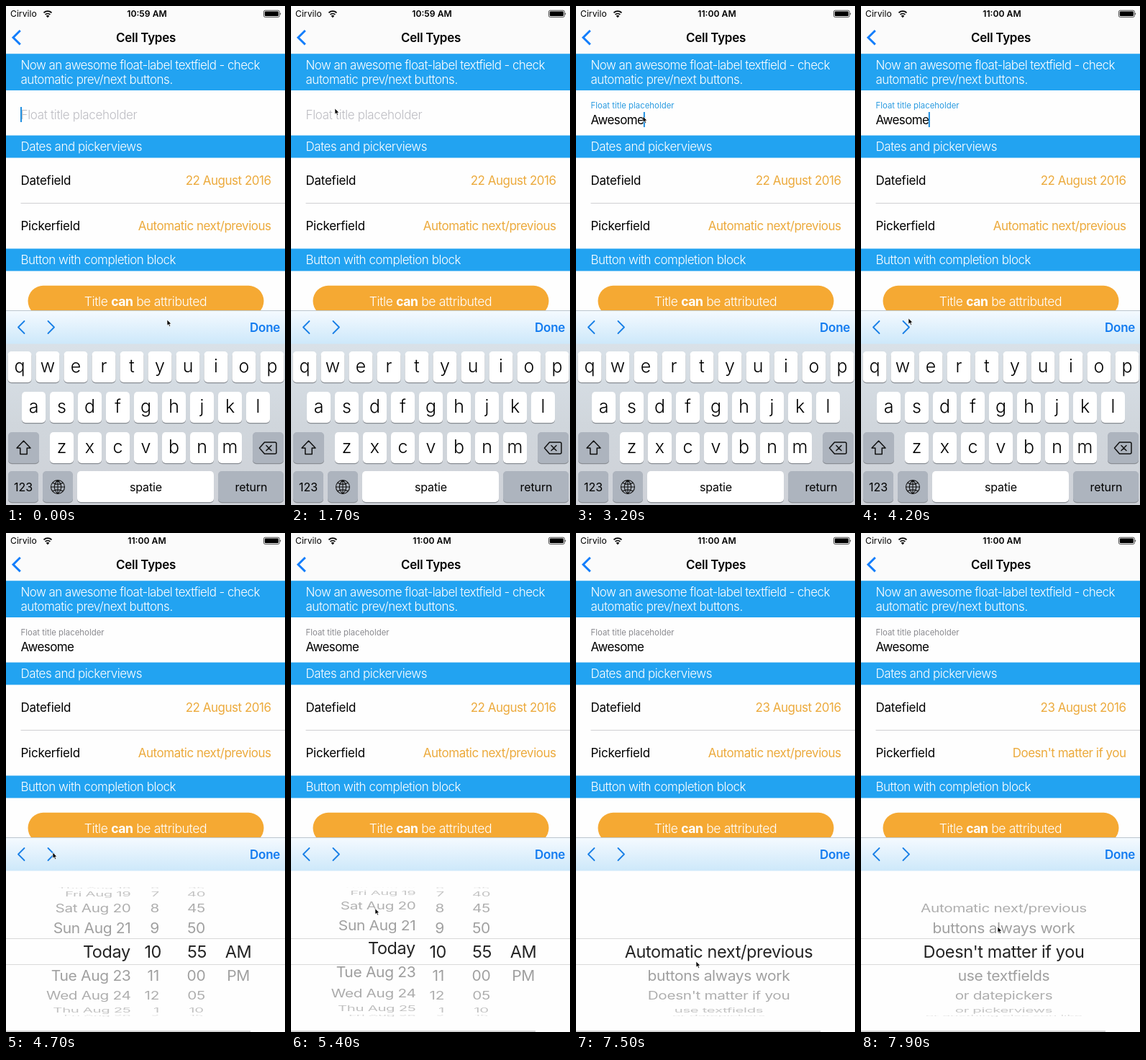
Recreate the animation shown at these times as an HTML page. Size 388 by 692 pixels, loop 8 s.

```html
<!DOCTYPE html>
<html lang="en">
<head>
<meta charset="utf-8">
<title>Cell Types</title>
<style>
html, body { margin: 0; width: 100%; height: 100%; overflow: hidden; background: #fff; }
svg { display: block; width: 100%; height: 100%; }
text { font-family: Inter, Roboto, sans-serif; font-size: 17px; letter-spacing: -.25px; }
.light { font-weight: 340; letter-spacing: -.47px; }
.head { fill: #fff; }
.value { fill: #ecaa3c; font-weight: 370; text-anchor: end; letter-spacing: -.48px; }
.bold { font-weight: 600; letter-spacing: -.3px; }
.status { font-size: 12.2px; letter-spacing: 0; }
.small { font-size: 11.4px; letter-spacing: 0; }
.key { font-size: 25px; font-weight: 320; letter-spacing: 0; text-anchor: middle; }
.word { font-size: 16px; letter-spacing: -.1px; text-anchor: middle; }
.row { font-size: 23.5px; letter-spacing: -.4px; }
.line { fill: none; stroke-linecap: round; stroke-linejoin: round; }
</style>
</head>
<body>
<svg id="stage" viewBox="0 0 388 692">
  <defs>
    <linearGradient id="barFill" x2="0" y2="1">
      <stop offset="0" stop-color="#f5faff"/><stop offset="1" stop-color="#cde8fa"/>
    </linearGradient>
    <linearGradient id="boardFill" x2="0" y2="1">
      <stop offset="0" stop-color="#d9e1e8"/><stop offset=".5" stop-color="#d0d6dc"/><stop offset="1" stop-color="#cfd2d8"/>
    </linearGradient>
    <clipPath id="lens"><path d="M0 563H388V598H0Z"/></clipPath>
    <clipPath id="rim"><path d="M0 486H388V563H0ZM0 599H388V676H0Z"/></clipPath>
  </defs>

  <rect width="388" height="692" fill="#fefefe"/>
  <rect width="388" height="67" fill="#fbfbfb"/>
  <text class="status" x="6" y="15">Cirvilo</text>
  <g class="line" stroke="#000" stroke-width="1.8" style="stroke-linecap:butt">
    <path d="M52.5 9.4A8 8 0 0 1 63.5 9.4M54.6 11.9A5 5 0 0 1 61.4 11.9"/>
  </g>
  <path d="M58 16.3L55.8 13.8A3.2 3.2 0 0 1 60.2 13.8Z"/>
  <text class="status bold" id="clock" x="196" y="15" text-anchor="middle" style="letter-spacing:0"></text>
  <rect x="358.4" y="6.2" width="22" height="9.2" rx="2" fill="none" stroke="#000" stroke-width=".7"/>
  <rect x="359.8" y="7.5" width="19.2" height="6.6" rx="1"/>
  <path d="M381.4 9.2Q383.2 10.8 381.4 12.4Z"/>
  <path class="line" d="M19.8 34L10 43.7L19.8 53.4" stroke="#147efb" stroke-width="3" style="stroke-linecap:butt;stroke-linejoin:miter"/>
  <text class="bold" x="194.5" y="50" text-anchor="middle">Cell Types</text>

  <path d="M0 66.2H388V116.9H0ZM0 179.5H388V210.6H0ZM0 336.5H388V367.6H0Z" fill="#22a3f1"/>
  <text class="light head" x="20.5" y="88" style="letter-spacing:-.58px">Now an awesome float-label textfield - check</text>
  <text class="light head" x="20.5" y="108">automatic prev/next buttons.</text>
  <text class="light head" x="20.5" y="201">Dates and pickerviews</text>
  <text class="light head" x="20.5" y="358">Button with completion block</text>

  <text class="light" id="placeholder" x="20.5" y="157" fill="#bdbdc3" style="letter-spacing:-.32px">Float title placeholder</text>
  <text class="small" id="label" x="20.5">Float title placeholder</text>
  <text id="typed" x="20.5" style="letter-spacing:-.6px"></text>
  <rect id="caret" width="2" height="21" fill="#1f8fe0"/>

  <text x="20.5" y="248">Datefield</text>
  <text class="value" id="date" x="368.6" y="248"></text>
  <path d="M20.5 273.5H388" stroke="#d0d0d3"/>
  <text x="20.5" y="311">Pickerfield</text>
  <text class="value" id="choice" x="368.6" y="311"></text>
  <rect x="30.5" y="387.8" width="328" height="42.5" rx="21.25" fill="#f5a933"/>
  <text class="light" x="194" y="415.5" text-anchor="middle" fill="#fff" style="font-size:17.6px;letter-spacing:-.4px">Title <tspan font-weight="700">can</tspan> be attributed</text>

  <g id="keyboard"><rect y="468" width="388" height="224" fill="url(#boardFill)"/></g>
  <g id="picker">
    <rect y="468" width="388" height="224" fill="#fefefe"/>
    <path d="M0 562.5H388M0 598.5H388" stroke="#d9d9d9"/>
    <path d="M0 691H340" stroke="#d4d4d4" stroke-width="2"/>
  </g>

  <rect y="422" width="388" height="46.5" fill="url(#barFill)"/>
  <path d="M0 422.5H388" stroke="#bcc6ce"/>
  <path class="line" d="M25.5 437L17 445.5L25.5 454M58.5 437L67 445.5L58.5 454" stroke="#187fe6" stroke-width="1.8"/>
  <text class="bold" x="381" y="452" text-anchor="end" fill="#127bf0">Done</text>
  <path id="mouse" d="M0 0V8.2L1.9 6.5L3.2 9.4L4.6 8.8L3.4 6L5.8 5.8Z" stroke="#fff" stroke-width=".7"/>
</svg>
<script>
const $ = id => document.getElementById(id);
const LOOP = 8000, STEP = 100;
const NEXT_DATE = 4400, NEXT_CHOICE = 7100;

function add(parent, tag, attrs, content = '') {
  const node = document.createElementNS('http://www.w3.org/2000/svg', tag);
  for (const name in attrs) node.setAttribute(name, attrs[name]);
  node.textContent = content;
  parent.append(node);
  return node;
}

// Keyboard
function key(x, y, w, fill = '#fff') {
  add($('keyboard'), 'rect', { x, y: y + 1.2, width: w, height: 43, rx: 5, fill: '#898d93' });
  add($('keyboard'), 'rect', { x, y, width: w, height: 43, rx: 5, fill });
}
['qwertyuiop', 'asdfghjkl', 'zxcvbnm'].forEach((letters, r) => {
  const left = [2.5, 22, 61][r], top = [479, 535, 591][r];
  [...letters].forEach((c, i) => {
    key(left + 39 * i, top, 33);
    add($('keyboard'), 'text', { class: 'key', x: left + 39 * i + 16.5, y: top + 29 }, c);
  });
});
const GRAY = '#adb4be';
[[3, 591, 43], [343, 591, 43], [3, 645, 42], [51, 645, 42], [295, 645, 91]].forEach(k => key(...k, GRAY));
key(99, 645, 190);
[['123', 24], ['spatie', 194.5], ['return', 341]].forEach(([s, x]) =>
  add($('keyboard'), 'text', { class: 'word', x, y: 672.5 }, s));
const icon = (d, width) => add($('keyboard'), 'path', { class: 'line', d, stroke: '#111', 'stroke-width': width });
icon('M24.5 603L34 613H29.2V621.5H19.8V613H15Z', 1.5);
icon('M359.5 605H374Q376 605 376 607V619Q376 621 374 621H359.5L352.5 613ZM362 609.5L369 616.5M369 609.5L362 616.5', 1.5);
icon('M62.5 667a9.5 9.5 0 1 0 19 0a9.5 9.5 0 1 0 -19 0ZM62.5 667H81.5M72 657.5V676.5' +
  'M72 657.5Q62.5 667 72 676.5M72 657.5Q81.5 667 72 676.5M64.7 661.3Q72 665 79.3 661.3M64.7 672.7Q72 669 79.3 672.7', 1.1);

// Picker wheels: rows on a cylinder, enlarged inside the centre lens
const RADIUS = 89, PITCH = 21.5 * Math.PI / 180, CENTER = 581;

function wheel(parent, x, lensX, anchor, name) {
  const layer = clip => {
    const g = add(parent, 'g', { 'clip-path': `url(#${clip})` });
    return Array.from({ length: 9 }, () => add(g, 'text', { class: 'row', 'text-anchor': anchor, y: 8.4 }));
  };
  const rim = layer('rim'), lens = layer('lens');
  const place = (node, text, px, py, sx, sy, opacity) => {
    node.textContent = text;
    node.setAttribute('transform', `translate(${px} ${py}) scale(${sx} ${sy})`);
    node.setAttribute('opacity', opacity);
  };
  return pos => rim.forEach((node, j) => {
    const i = Math.round(pos) + j - 4;
    const angle = (i - pos) * PITCH, c = Math.max(Math.cos(angle), 0.01), y = RADIUS * Math.sin(angle);
    const text = name(i) || '';
    place(node, text, x, CENTER + y, .84 + .06 * c, .9 * c, .11 + .28 * c);
    place(lens[j], text, lensX, CENTER + 1.1 * y, 1, c, .86);
  });
}

const DAYS = ['Sun', 'Mon', 'Tue', 'Wed', 'Thu', 'Fri', 'Sat'];
const CHOICES = ['Automatic next/previous', 'buttons always work', "Doesn't matter if you",
  'use textfields', 'or datepickers', 'or pickerviews', 'or anything else you like'];
const dateWheels = add($('picker'), 'g', {}), choiceWheels = add($('picker'), 'g', {});
const turnDay = wheel(dateWheels, 173.5, 172.8, 'end', d => d === 22 ? 'Today' : `${DAYS[d % 7]} Aug ${d}`);
wheel(dateWheels, 213, 216, 'end', h => (h + 11) % 12 + 1)(10);
wheel(dateWheels, 264.5, 265.5, 'middle', m => String(m * 5 % 60).padStart(2, '0'))(11);
wheel(dateWheels, 323, 323, 'middle', i => ['AM', 'PM'][i])(0);
const turnChoice = wheel(choiceWheels, 198.5, 198.5, 'middle', i => CHOICES[i]);

// Timeline: [time, value...]
const MOUSE = [[0, 224, 435], [100, 224, 435], [600, 140, 270], [700, 140, 270], [1600, 61, 142],
  [3100, 61, 142], [3200, 93, 153], [3400, 93, 153], [4300, 65, 443], [4700, 65, 443],
  [5200, 116, 528], [5900, 121, 491], [6100, 121, 491], [6900, 64, 443], [7100, 64, 443],
  [7500, 167, 594], [7900, 190, 546]];
const DAY = [[5300, 22], [5500, 22.3], [5800, 22.95], [5900, 23.03], [6000, 23]];
const CHOICE = [[7500, 0], [7600, .8], [7700, 1.7], [7800, 2]];
const TYPING = [2000, 2100, 2300, 2400, 2600, 2700, 2900];

function at(track, t) {
  const n = track.findIndex(k => k[0] > t);
  if (n < 0) return track[track.length - 1].slice(1);
  if (n === 0) return track[0].slice(1);
  const [a, b] = [track[n - 1], track[n]];
  const u = (t - a[0]) / (b[0] - a[0]), e = u * u * (3 - 2 * u);
  return a.slice(1).map((v, i) => v + (b[i + 1] - v) * e);
}
const show = (node, on) => node.setAttribute('visibility', on ? 'visible' : 'hidden');
const clamp = v => Math.min(1, Math.max(0, v));

function render(t) {
  const count = TYPING.filter(k => k <= t).length;
  const floated = clamp((t - 1900) / 300), textY = 157 + 7 * floated;
  $('clock').textContent = t < 2600 ? '10:59 AM' : '11:00 AM';
  show($('placeholder'), !count);
  show($('label'), count);
  $('label').setAttribute('y', 150 - 8 * floated);
  $('label').setAttribute('opacity', floated);
  $('label').setAttribute('fill', t < NEXT_DATE ? '#2a9be0' : '#8a8a8f');
  $('typed').textContent = 'Awesome'.slice(0, count);
  $('typed').setAttribute('y', textY);

  const resting = t < 2000 ? t : t < 2900 ? 0 : t - 2900;
  $('caret').setAttribute('x', 20 + (count ? $('typed').getComputedTextLength() : 0));
  $('caret').setAttribute('y', textY - 17);
  $('caret').setAttribute('opacity', t < NEXT_DATE ? clamp((650 - resting % 1000) / 200) : 0);

  $('date').textContent = `${t < 6000 ? 22 : 23} August 2016`;
  $('choice').textContent = CHOICES[t < 7900 ? 0 : 2];
  show($('keyboard'), t < NEXT_DATE);
  show($('picker'), t >= NEXT_DATE);
  show(dateWheels, t >= NEXT_DATE && t < NEXT_CHOICE);
  show(choiceWheels, t >= NEXT_CHOICE);
  turnDay(at(DAY, t)[0]);
  turnChoice(at(CHOICE, t)[0]);

  $('mouse').setAttribute('transform', `translate(${at(MOUSE, t)})`);
  show($('mouse'), t < 2000 || t >= 3200);
}

const start = performance.now();
function tick() {
  const t = (performance.now() - start) % LOOP;
  render(Math.floor(t / STEP) * STEP);
  requestAnimationFrame(tick);
}
tick();
</script>
</body>
</html>
```
